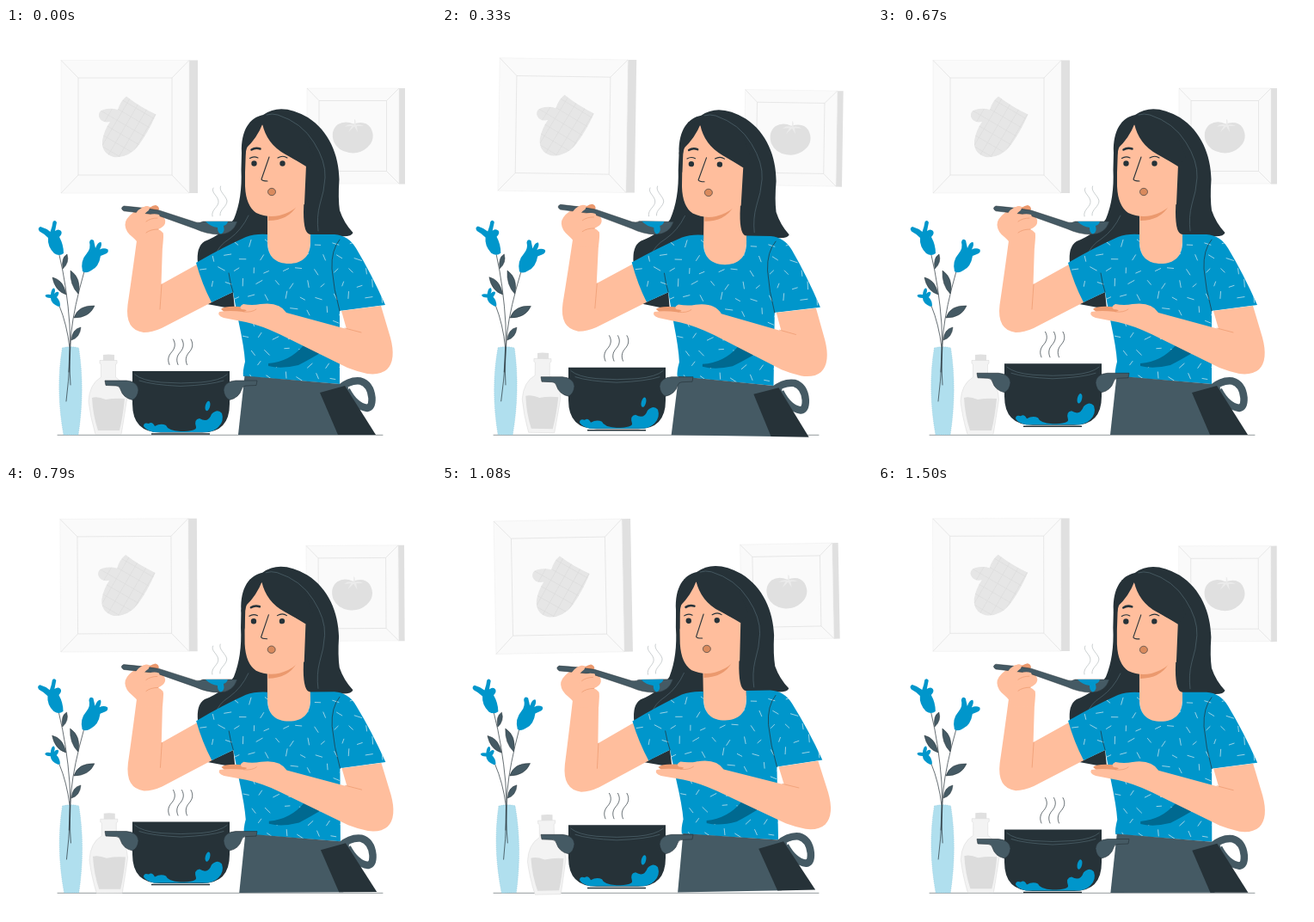
Recreate the animation shown at these times as an HTML page. Size 500 by 500 pixels, loop 1.54 s.

```html
<!DOCTYPE html>
<html lang="en">
<head>
<meta charset="utf-8">
<title>Tasting the soup</title>
<style>
html, body { margin: 0; width: 100%; height: 100%; overflow: hidden; background: #fff; }
svg { display: block; width: 100%; height: 100%; }
.dark { fill: #263238; }
.slate { fill: #455a64; }
.blue { fill: #0096cb; }
.skin { fill: #ffbe9d; }
.shade { fill: #eb996e; }
.grey { fill: #e0e0e0; }
.line { fill: none; stroke: #263238; stroke-width: .7; stroke-linecap: round; stroke-linejoin: round; }
.bold { stroke-width: 1.1; }
.brow { stroke-width: 2.5; }
.soft { stroke: #eb996e; }
.strand { stroke: #51666f; }
.pale { stroke: #b4babc; }
.frame { fill: #fafafa; stroke: #ececec; stroke-width: .5; }
.edge { fill: none; stroke: #dadada; stroke-width: .6; }
</style>
</head>
<body>
<svg viewBox="0 0 500 500">
  <defs>
    <clipPath id="mittClip"><path id="mitt" d="M140 79.500Q156 92 174.500 100.500Q165 122 153 138Q141 152 125 150Q111 146 112 131Q114 119 121 109Q111 111 108 103Q107 97 113 95Q122 92.500 130 95Q133 85 140 79.500Z"/></clipPath>
    <path id="shirt" d="M221 273Q252 255 279 243Q290 239 304 240V249C304 266 314 274 329 274C344 274 354 266 354 249V240L382 240Q398 241 407 256Q425 286 441 322L388 329V414L276 405Q275 399 278 388Q277 372 271 344L264 307L239 319Q228 298 221 273Z"/>
    <clipPath id="shirtClip"><use href="#shirt"/></clipPath>
    <path id="handle" d="M115 410H140Q153 411 154 421Q153 430 147 432.500Q136 430 133 420Q132 416 128 416L116 415.500Z"/>
    <path id="wisp" d="M194.500 362C198 368 196 373 192.500 377C188 382 188 387 190 391.500"/>
  </defs>

  <path class="line" style="stroke-width:.5" d="M60 473.300H438"/>

  <g id="scene">
    <!-- wall frames -->
    <path class="grey" d="M213 37.500H223V192H213Z"/>
    <path class="frame" d="M64 37.500H213V192H64Z"/>
    <path class="edge" d="M84 58H193V171H84ZM64 37.500L84 58M213 37.500L193 58M64 192L84 171M213 192L193 171"/>
    <use href="#mitt" fill="#e6e6e6"/>
    <g clip-path="url(#mittClip)"><path id="quilt" class="edge"/></g>
    <path class="grey" d="M457 70H464V181.500H457Z"/>
    <path class="frame" d="M350 70H457V181H350Z"/>
    <path class="edge" d="M364 84.500H442.500V166.500H364ZM350 70L364 84.500M457 70L442.500 84.500M350 181L364 166.500M457 181L442.500 166.500"/>
    <path class="grey" d="M404 111.500Q418 107 424 116Q431 129 420 139Q411 147 399 145Q386 143 381 132Q377 119 386 112Q394 107 404 111.500Z"/>
    <path fill="#ebebeb" d="M405 106Q407 106 406.500 112.500Q412 111.500 416 114L408 114L409 121L405 114.500L398 121L402 114L394 114.500Q399 111 405 112.500Z"/>

    <!-- bottle -->
    <path class="grey" d="M113 380Q119 379 126 380V387H113Z"/>
    <path fill="#f3f3f3" stroke="#dcdcdc" stroke-width=".6" d="M109 386.500H129V390L127.500 391V406Q140 414 140.500 432Q137 455 134 472.500H104Q98 452 96 434Q97 414 110.500 406V391L109 390Z"/>
    <path fill="#dcdcdc" d="M100 430Q106 428 116 432Q127 430 138 431Q136 452 132 468H107Q101 450 100 430Z"/>

    <!-- hair and head -->
    <path class="dark" d="M274 145C273 118 284 104 299 101Q320 86 351 104C376 120 387 148 387.500 176Q386 198 388 212Q393 227 403.500 238Q402 243 388 242L350 246L290 250L223 274Q221 254 231 248Q254 239 265 222Q275 198 273.500 165Z"/>
    <path class="skin" d="M304 205V250Q306 276 329 276Q353 275 354 249V240Q346 240 346 214L347 180Z"/>
    <path class="shade" d="M305 218Q325 218 338 207Q328 224 305 224Z"/>
    <path class="skin" d="M298 112Q283 122 278 148V184Q279 207 291 215Q304 221 318 218Q330 215 338 208L347 205L349 159Q318 148 298 112Z"/>
    <path class="dark" d="M298 111Q303 135 325 147Q338 154 349 161L358 150L342 108L315 98ZM299 110Q292 128 279 140L278 168L274 145L284 109Z"/>
    <path class="line strand" d="M303 101Q309 99 316 101Q344 110 358 133Q372 155 371 174Q370 190 365 205Q361 220 363 236M282 218Q274 235 260 245Q247 253 243 265"/>
    <path class="line brow" d="M285.500 141.500Q290 138.500 295.500 140.500"/>
    <path class="line bold" d="M283.500 151.500Q288 148.500 293 151M316 151Q322 147.500 327 151"/>
    <circle class="dark" cx="288.500" cy="157.500" r="3.200"/>
    <circle class="dark" cx="321.500" cy="157.500" r="3.200"/>
    <path class="line bold" d="M306 150L297 176Q298 178 304 178"/>
    <ellipse cx="309" cy="190.500" rx="4.500" ry="4.200" fill="#d98a5d" stroke="#263238" stroke-width=".6"/>

    <!-- raised arm -->
    <path class="dark" d="M234 321L264 307L266 327Z"/>
    <path class="skin" d="M222 275L180.500 298L182.500 238L153 240Q147 285 141.500 322Q138 351 160 354Q170 354 181 349L241 318Z"/>
    <path class="line soft" d="M181 298L179 327"/>
    <use href="#shirt" class="blue"/>
    <g clip-path="url(#shirtClip)"><path id="dashes" fill="none" stroke="#c4e2ec" stroke-width=".8" stroke-linecap="round"/></g>
    <path fill="#006990" d="M305 390Q330 388 346 369L372 374Q352 386 340 392Q320 397 305 393Z"/>
    <path class="line" d="M388 246Q378 258 379 280Q381 304 388 329M259 285Q261 298 264 307"/>

    <!-- spoon and hand -->
    <path class="skin" d="M157 256Q154 249 147 243Q139 237 138.500 229Q138 222 148 214.500Q158 206 168 208L178 215Q187 222 185 227Q184 231 177 234Q184 237 183 243L182 256Z"/>
    <path class="shade" d="M163 214Q167 207 174 206Q178 207 178 211L171 217Z"/>
    <path class="slate" stroke="#263238" stroke-width=".5" d="M137 207Q160 209 178 212L221 226Q226 227 229 225H269Q264 240 248 240Q234 240 220 233.500L174 217L137 212.800Q132 209.500 137 207Z"/>
    <path class="blue" d="M232 225H258Q257 229 253 230Q255 238 250 239.500Q246 239 246 232Q238 231 232 225Z"/>
    <path class="skin" d="M148 221Q153 209 163 207Q169 207 166 212Q160 216 157 223ZM160 222Q168 214 178 217Q180 220 176 221Q185 221 185 226Q184 230 172 231L160 231Z"/>
    <path class="line soft" d="M176 221Q168 221 163 225M177 234Q168 234 163 238"/>
    <g class="line pale">
      <path d="M241 186C238 191 246 195 247 201C248 208 238 211 240 219"/>
      <path d="M249.500 184C247 190 256 195 257 201C257 208 248 211 249 218"/>
    </g>

    <!-- apron -->
    <path class="slate" d="M277.500 404.500L388 414L398 418L391 473H270Z"/>
    <path fill="none" stroke="#455a64" stroke-width="8.500" stroke-linejoin="round" d="M388 419Q400 409 412 410.500Q424 414 425.500 430Q426 441 420 442Q406 440 396 421"/>
    <path class="dark" d="M365 424L394 416L430 473H386Z"/>

    <!-- resting arm -->
    <path class="shade" d="M250 327Q254 323 271 324L290 327L280 334L255 331Z"/>
    <path class="skin" d="M390 329L436 323L447 360Q454 386 443 397Q435 404 420 402Q407 399 397 395L318 356Q297 346 279 342L253 337Q245 334 248 330Q259 328 276 330Q284 328 274 327Q270 324 276 321Q286 323 296 321Q318 318 326 331L396 350Z"/>
    <path class="line soft" d="M394 349L413 354M276 330Q286 331 291 327"/>
  </g>

  <g id="plant">
    <path fill="#b0dfee" stroke="#86c5da" stroke-width=".5" stroke-dasharray="1.500 1" d="M65.500 372Q75 369.500 84.500 372Q92 420 84 473H67Q57.500 420 65.500 372Z"/>
    <path class="line" d="M62 264Q71 302 74 345Q76 385 70 434M91 283Q79 325 76 353Q73 390 75 415M62 323Q71 345 74 372L73 400"/>
    <path class="blue" d="M56 262Q48 254 49 244Q44 239 39 236.500Q36 233 40 231Q47 233 51.500 237Q54 230 54.500 225.500Q57 222.500 59 226L57 236Q61 233 64 236Q66 239 62 243Q67 252 67 262Q62 266 56 262Z"/>
    <path class="blue" d="M89 283Q86 271 94 262Q99 256 97 249Q98 244 102 247L104 256Q107 248 110.500 249Q112 252 109 257.500Q114 255 118.500 257.500Q120 261 115 263L110 265Q108 278 99 282Q93 286 89 283Z"/>
    <path class="blue" d="M61 324Q52 320 52 314Q46 314 45.500 311Q47 309 52 310Q53 302 56 302.500Q58 305 56 309Q60 305 61.500 308Q61 311 59 313Q63 317 63 323Z"/>
    <path class="slate" stroke="#263238" stroke-width=".5" d="M66 280Q64 267 71 263Q74 273 66 280ZM54 290Q67 293 70 310Q57 306 54 290ZM75 282Q88 291 84 309Q74 299 75 282ZM79 337Q84 322 103 323Q97 337 79 337ZM76 363Q77 350 87 348Q86 360 76 363Z"/>
  </g>

  <g id="pot">
    <g class="line">
      <use href="#wisp"/><use href="#wisp" x="10"/><use href="#wisp" x="20.500"/>
    </g>
    <path class="dark" d="M147 399H260V437Q260 470.500 228 470.500H180Q147 470.500 147 437ZM169 471.300H237V472.800H169Z"/>
    <path class="line strand" d="M150 403Q158 410 180 412Q203 414 227 412Q249 410 257 403M155 410Q170 415 203 416.500Q238 415 253 410"/>
    <path class="blue" d="M160 463Q160 458 166 460Q170 457 173 463Q180 459 186 462Q188 468 203 469Q222 469 221 464Q218 455 225 454Q235 460 239 449Q246 442 251 448Q254 457 247 464Q242 469 234 470H172Q163 468 160 463Z"/>
    <ellipse class="blue" cx="234.500" cy="439.500" rx="2.700" ry="5.800" transform="rotate(14 234.500 439.500)"/>
    <g class="slate" stroke="#263238" stroke-width=".6">
      <use href="#handle"/>
      <use href="#handle" transform="translate(407 0) scale(-1 1)"/>
    </g>
  </g>
</svg>
<script>
const LOOP = 1540, LEAD = 50;
const el = id => document.getElementById(id);

// small seeded generator for the fabric pattern
let seed = 11;
const rand = () => (seed = (seed * 16807) % 2147483647) / 2147483647;

function fabric() {
  let d = "";
  for (let row = 0; row < 11; row++)
    for (let col = 0; col < 12; col++) {
      const x = 226 + col * 19 + (row % 2) * 9 + rand() * 6;
      const y = 248 + row * 15.5 + rand() * 6;
      const a = rand() * Math.PI, r = 2.6 + rand() * 1.8;
      const dx = Math.cos(a) * r, dy = Math.sin(a) * r;
      d += `M${(x - dx).toFixed(1)} ${(y - dy).toFixed(1)}L${(x + dx).toFixed(1)} ${(y + dy).toFixed(1)}`;
    }
  return d;
}

// lines along and across the cuff
function quilting() {
  let d = "";
  for (let i = 0; i < 8; i++)
    d += `M${122 - i * 6} ${76 + i * 10}l80 47M${124 + i * 10} ${70 + i * 6}l-50 85`;
  return d;
}

el("dashes").setAttribute("d", fabric());
el("quilt").setAttribute("d", quilting());

// 0 at the start, 1 at a quarter, -1 at three quarters, all linear
const sway = p => p < .25 ? p * 4 : p < .75 ? 2 - p * 4 : p * 4 - 4;
const lift = p => 10 * (1 - Math.abs(1 - 2 * p));
const rest = LEAD / LOOP;

function draw(ms) {
  const p = ((ms + LEAD) % LOOP) / LOOP;
  const angle = (sway(p) - sway(rest)).toFixed(4);
  el("scene").setAttribute("transform", `rotate(${angle} 250 250)`);
  el("plant").setAttribute("transform", `rotate(${angle} 78 348)`);
  el("pot").setAttribute("transform", `translate(0 ${(lift(rest) - lift(p)).toFixed(3)})`);
}

const start = performance.now();
function tick() {
  draw(performance.now() - start);
  requestAnimationFrame(tick);
}
draw(0);
requestAnimationFrame(tick);
</script>
</body>
</html>
```
